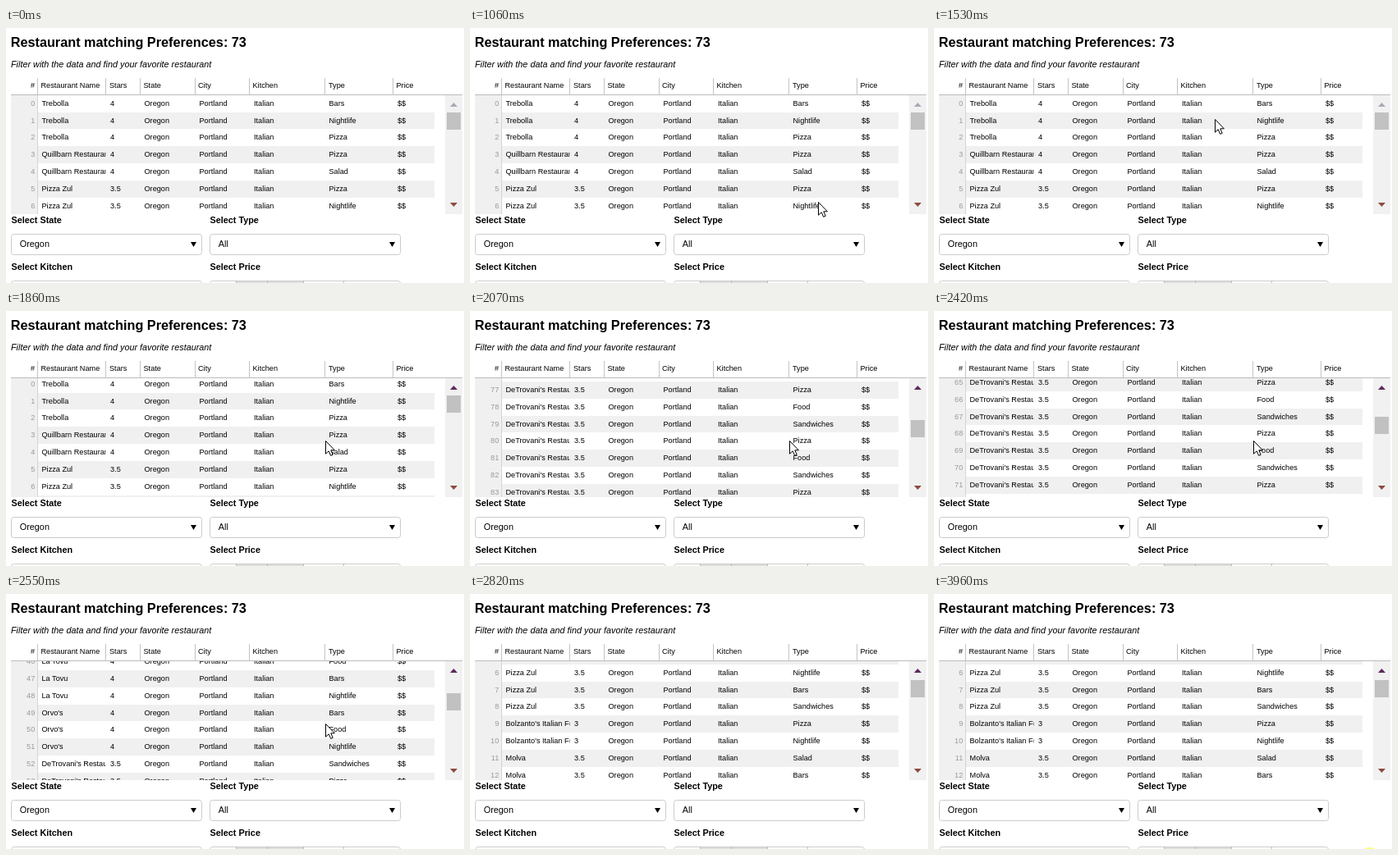
These frames come from a looping animation (558 px wide and 311 px high, 4090 ms). An HTML page:

```html
<!DOCTYPE html>
<html lang="en">
<head>
<meta charset="utf-8">
<title>Restaurant filter</title>
<style>
  html, body { margin: 0; width: 100%; height: 100%; overflow: hidden; background: #fff; }
  svg { display: block; width: 558px; height: 311px; }
  text { font-family: "Liberation Sans", Arial, sans-serif; font-size: 9.17px; fill: #000; white-space: pre; }
  .title { font-size: 16.25px; font-weight: bold; }
  .note { font-size: 10.83px; font-style: italic; }
  .label { font-size: 10.83px; font-weight: bold; }
  .value { font-size: 10.83px; }
  .index { fill: #999; text-anchor: end; }
  .end { text-anchor: end; }
</style>
</head>
<body>
<svg id="stage" viewBox="0 0 558 311">
  <defs>
    <clipPath id="tableClip"><rect x="6" y="82" width="516" height="145"/></clipPath>
    <clipPath id="nameClip"><rect x="39" y="-2" width="82.5" height="25"/></clipPath>
  </defs>
  <rect width="558" height="311" fill="#fff"/>
  <text class="title" x="5.7" y="23">Restaurant matching Preferences: 73</text>
  <text class="note" x="6" y="48">Filter with the data and find your favorite restaurant</text>
  <g id="header"></g>
  <g id="rows" clip-path="url(#tableClip)"></g>
  <path d="M6 81.5H556" stroke="#bbb"/>
  <rect x="535" y="82" width="21" height="145" fill="#f1f1f1"/>
  <rect id="thumb" x="537" width="17" height="21" fill="#c1c1c1"/>
  <path id="up" d="M541 96L545.5 91L550 96Z"/>
  <path d="M541 213L545.5 218L550 213Z" fill="#8c4a3c"/>
  <g id="form"></g>
  <circle id="spot" cx="531" cy="322" r="13" fill="#ffff80"/>
  <path id="cursor" d="M.5 .5V16.2L4.2 12.8L6.7 18.4L9.2 17.3L6.8 11.8H11.4Z" fill="#fff" stroke="#000" stroke-linejoin="round"/>
</svg>
<script>
const LOOP = 4090;
const PITCH = 20.833;
const TOP = 81.7;
const byId = id => document.getElementById(id);

function add(parent, tag, attrs, content = "") {
  const node = document.createElementNS("http://www.w3.org/2000/svg", tag);
  for (const key in attrs) node.setAttribute(key, attrs[key]);
  node.textContent = content;
  parent.appendChild(node);
  return node;
}

// Groups of consecutive rows: first row, name, stars, dishes, city
const groups = [
  [0, "Trebolla", "4", "Bars,Nightlife,Pizza"],
  [3, "Quillbarn Restaurant", "4", "Pizza,Salad"],
  [5, "Pizza Zul", "3.5", "Pizza,Nightlife,Bars,Sandwiches"],
  [9, "Bolzanto's Italian Food", "3", "Pizza,Nightlife"],
  [11, "Molva", "3.5", "Salad,Bars,Pizza,Food"],
  [45, "La Tovu", "4", "Pizza,Food,Bars,Nightlife"],
  [49, "Orvo's", "4", "Bars,Food,Nightlife"],
  [52, "DeTrovani's Restaurant", "3.5", "Sandwiches,Pizza,Food"],
  [94, "Zelo - Bistro Bar Pizza", "4", "Food,Pizza,Nightlife,Bars"],
  [98, "Vermoli", "4", "Food", "Beaverton"],
  [99, "a Ludo Ristorante", "4.5", "Pizza"],
  [100, "Trunvo", "2", "Pizza"],
  [101, "Pasta Grilvo", "4", "Sandwiches,Fast Food,Pizza", "Beaverton"]
];

function record(i) {
  const [first, name, stars, dishes, city = "Portland"] = groups.findLast(g => g[0] <= i);
  const list = dishes.split(",");
  return [i, name, stars, "Oregon", city, "Italian", list[(i - first) % list.length], "$$"];
}

// Header
const header = byId("header");
const heads = [["#", 35], ["Restaurant Name", 42.5], ["Stars", 126], ["State", 167.5],
  ["City", 234], ["Kitchen", 300.5], ["Type", 393], ["Price", 475.5]];
heads.forEach(([label, x], i) => add(header, "text", { x, y: 73, class: i ? "" : "end" }, label));
for (const x of [38, 121, 163, 230, 296, 388, 471])
  add(header, "path", { d: `M${x + .5} 61V81`, stroke: "#c4c4c4" });

// Reusable row nodes
const cellX = [35.3, 43.5, 127, 168.5, 235.5, 302, 393.5, 477];
const pool = Array.from({ length: 9 }, () => {
  const group = add(byId("rows"), "g", {});
  const stripe = add(group, "rect", { x: 38, width: 484, height: 21 });
  add(group, "rect", { x: 6, width: 32, height: 21.5, fill: "#f0f0f0" });
  add(group, "path", { d: "M38.5 0V21.5", stroke: "#d4d4d4" });
  const cells = cellX.map((x, i) => {
    const holder = i === 1 ? add(group, "g", { "clip-path": "url(#nameClip)" }) : group;
    return add(holder, "text", { x, y: 13, class: i ? "" : "index" });
  });
  return { group, stripe, cells };
});

// Form
const form = byId("form");
function field(x, y, label, value) {
  add(form, "text", { x: x + .5, y: y - 13, class: "label" }, label);
  add(form, "rect", { x: x + .5, y: y + .5, width: 232, height: 25, rx: 3, fill: "#fff", stroke: "#ccc" });
  if (!value) return;
  add(form, "text", { x: x + 10.8, y: y + 16, class: "value" }, value);
  add(form, "path", { d: `M${x + 219} ${y + 10}h7l-3.5 6z` });
}
field(6, 251, "Select State", "Oregon");
field(248, 251, "Select Type", "All");
field(6, 308, "Select Kitchen");
field(248, 308, "Select Price");
add(form, "rect", { x: 281, y: 309, width: 82, height: 2, fill: "#ddd" });
for (const x of [280, 318, 362, 411])
  add(form, "path", { d: `M${x + .5} 308V311`, stroke: "#bbb" });

// Motion
const ticks = [0, 1060, 1120, 1190, 1260, 1330, 1400, 1460, 1530, 1610, 1730, 1800, 1860, 1930, 2000,
  2070, 2140, 2210, 2280, 2350, 2420, 2480, 2550, 2620, 2700, 2760, 2820, 3960];
const scrollKeys = [[1800, 0], [1860, 3], [1930, 250], [2000, 900], [2070, 1600], [2140, 2080],
  [2210, 1990.5], [2550, 968], [2820, 121]];
const pointerKeys = [[1060, 424, 212], [1190, 520, 110], [1260, 543, 75], [1330, 470, 26],
  [1460, 301, 70], [1610, 389, 158], [2620, 389, 158], [2700, 400, 227]];

function sample(keys, t) {
  const next = keys.findIndex(k => k[0] > t);
  if (next === 0) return keys[0].slice(1);
  if (next < 0) return keys[keys.length - 1].slice(1);
  const a = keys[next - 1], b = keys[next];
  const p = (t - a[0]) / (b[0] - a[0]);
  return a.slice(1).map((v, i) => v + (b[i + 1] - v) * p);
}

const show = (node, on) => node.setAttribute("visibility", on ? "visible" : "hidden");

function draw(time) {
  const t = ticks.findLast(tick => tick <= time);
  const [scroll] = sample(scrollKeys, t);
  const first = Math.floor(scroll / PITCH);
  pool.forEach(({ group, stripe, cells }, n) => {
    const i = first + n;
    group.setAttribute("transform", `translate(0 ${Math.round(TOP + i * PITCH - scroll)})`);
    stripe.setAttribute("fill", i % 2 ? "#f0f0f0" : "#fff");
    record(i).forEach((value, c) => { cells[c].textContent = value; });
  });
  byId("thumb").setAttribute("y", Math.round(103 + scroll / 53));
  byId("up").setAttribute("fill", scroll > 0 ? "#5b2a5e" : "#aaa8b8");

  const [x, y] = sample(pointerKeys, t).map(Math.round);
  byId("cursor").setAttribute("transform", `translate(${x} ${y})`);
  show(byId("cursor"), t >= 1060 && t < 2760);
  show(byId("spot"), t >= 3960);
}

const start = performance.now();
function loop() {
  draw((performance.now() - start) % LOOP);
  requestAnimationFrame(loop);
}
loop();
</script>
</body>
</html>
```
